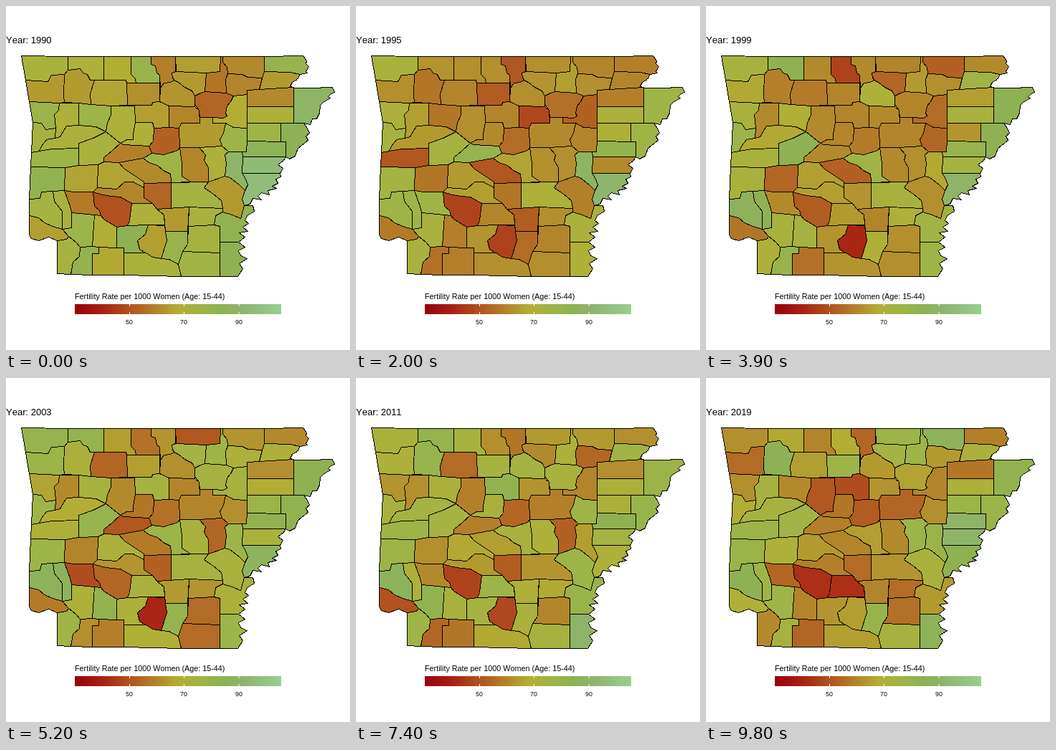
Write an HTML page that moves like this. It is 480x480 px and loops after 10 s.

```html
<!DOCTYPE html>
<html lang="en">
<head>
<meta charset="utf-8">
<title>Fertility rate by county</title>
<style>
html, body { margin: 0; width: 100%; height: 100%; overflow: hidden; background: #fff; }
svg { display: block; width: 100%; height: 100%; }
text { font-family: "Liberation Sans", Arial, sans-serif; font-kerning: none; }
#map path { stroke: #000; stroke-width: 1; stroke-linejoin: round; }
</style>
</head>
<body>
<svg viewBox="0 0 480 480">
<defs><linearGradient id="ramp"></linearGradient></defs>
<text id="year" x="0" y="52" font-size="13">Year: 1990</text>
<!-- data-v: rate at each of the key years -->
<g id="map" transform="translate(-.5 -.5)" shape-rendering="crispEdges">
<path d="M22 70 87 71V90L82 96 64 97 59 106 28 104Z" data-v="72 72 73 80 72 72 62"/>
<path d="M87 71H137V104H118L114 96 108 94 104 88 87 90Z" data-v="70 63 83 80 80 71 67"/>
<path d="M137 71H175V96L181 102 182 108H169L168 104H137Z" data-v="68 62 61 65 73 71 60"/>
<path d="M175 71H203V82L209 84 211 94 215 97V108H182L181 102 175 96Z" data-v="79 62 47 56 62 76 68"/>
<path d="M203 71H237V92L232 94 233 100 235 104 230 107 221 108 216 115 215 97 211 94 209 84 203 82Z" data-v="59 51 61 63 57 65 54"/>
<path d="M237 71H300V92L280 94 238 92Z" data-v="65 62 60 51 64 64 77"/>
<path d="M300 71H303V79L309 86 310 94 307 103 308 122 278 120 280 94 299 92Z" data-v="57 65 64 76 70 79 77"/>
<path d="M303 71H361V92L358 101 338 100 330 96 310 95 309 86 303 79Z" data-v="61 60 53 63 64 66 86"/>
<path d="M361 71 415 70 420 77 419 81 423 85 419 92 421 94 411 96 397 93 361 92Z" data-v="80 59 61 61 62 73 59"/>
<path d="M361 92 397 93 411 96 407 103 400 107 397 113 402 114 354 117 358 101Z" data-v="64 60 75 70 75 70 71"/>
<path d="M310 95 330 96 338 100 358 101 354 117 337 118V124L318 126 308 122 307 103Z" data-v="60 62 62 70 54 64 64"/>
<path d="M337 118 354 117 402 114V141H337Z" data-v="61 59 65 62 62 67 57"/>
<path d="M402 115H438L442 114H456L459 121 454 123 450 127 453 129 443 135 439 139 438 150 434 158 428 158 425 166 416 164H402Z" data-v="89 76 84 83 78 80 82"/>
<path d="M28 104 59 106 64 97 82 96 81 125 82 135 75 136 33 134Z" data-v="64 62 67 77 70 60 55"/>
<path d="M82 96 87 90 104 88 108 94 114 96 118 104H124L118 123 119 138 102 136 82 135 81 125Z" data-v="64 57 59 71 80 75 84"/>
<path d="M124 104H168L169 108 170 139 147 140 119 138 118 123Z" data-v="66 60 58 54 55 60 65"/>
<path d="M169 108H215V134L205 135 204 139H170Z" data-v="62 52 60 65 73 61 77"/>
<path d="M216 115 221 108 230 107 235 104 241 107 250 114 260 119 264 126V141L228 140 215 134Z" data-v="63 62 70 62 74 70 64"/>
<path d="M238 92 280 94 278 120 272 122 264 126 260 119 250 114 241 107 235 104 233 100 232 94Z" data-v="64 63 54 74 61 58 74"/>
<path d="M278 120 308 122 318 126 314 134 309 140 307 150 309 154 304 157 289 156H271L270 146 264 138V126L272 122Z" data-v="54 56 60 73 72 61 66"/>
<path d="M318 126 337 124V171L318 170 307 164H289V156L304 157 309 154 307 150 309 140 314 134Z" data-v="68 53 55 73 60 53 60"/>
<path d="M33 134 75 136 74 146 68 152 70 171 56 173 50 164 38 163Z" data-v="78 70 72 66 63 69 62"/>
<path d="M75 136H102V167L85 168 76 183 69 185 70 171 68 152 74 146Z" data-v="70 65 61 61 62 72 73"/>
<path d="M102 136 119 138 147 140V152L142 164 140 176 126 169 102 167Z" data-v="77 57 69 73 71 72 61"/>
<path d="M147 140H180L181 163 178 179V187H169L160 192 140 176 142 164 147 152Z" data-v="70 62 61 61 59 61 51"/>
<path d="M180 139H204L205 135 215 134 228 140V170L207 171 205 163H181Z" data-v="65 60 60 73 82 73 49"/>
<path d="M228 140 264 141 270 146 271 164H245L242 171 228 170Z" data-v="60 48 61 60 63 60 63"/>
<path d="M337 141H402V164H337Z" data-v="70 70 72 68 71 69 70"/>
<path d="M337 164H384V190L336 189Z" data-v="76 70 63 78 71 66 77"/>
<path d="M384 164H416L421 171 424 178 419 182 422 188 413 195 408 199 404 210 396 214 391 211V190H384Z" data-v="84 76 83 82 79 80 78"/>
<path d="M336 189 391 190V211H331L330 204H336Z" data-v="86 81 80 82 83 78 90"/>
<path d="M331 211H391L388 216 380 222 387 227 383 234H330Z" data-v="95 61 74 72 74 80 90"/>
<path d="M330 234H383L384 239 377 242 380 248 372 252 378 255 366 258 368 264 357 261 352 266 357 271 345 269 341 277 333 279 330 270 334 258 338 250 334 240Z" data-v="96 91 89 87 70 78 83"/>
<path d="M307 164 318 170 337 171V188L336 204H311L302 196 299 187 304 178Z" data-v="77 60 54 62 76 62 62"/>
<path d="M242 171 245 164H271V156H289V164H307L304 178 299 187 302 196 270 198H243Z" data-v="64 61 60 60 59 68 54"/>
<path d="M207 171 228 170 242 171 243 198 240 202 221 208 204 206 200 196 206 189Z" data-v="53 55 58 56 54 53 52"/>
<path d="M181 163H205L207 171 206 189 200 196 165 194 160 192 169 187H178V179Z" data-v="69 61 60 57 71 70 57"/>
<path d="M192 213 204 206 221 208 240 202 243 198 246 220V238L258 246 231 247V243L230 235 220 230 212 223 200 219Z" data-v="76 66 75 77 72 67 65"/>
<path d="M243 198H270L279 208 277 216 283 226V246H258L246 238V220Z" data-v="60 62 61 72 70 64 61"/>
<path d="M270 198 302 196 311 204 306 208 308 220 306 238 283 246V226L277 216 279 208Z" data-v="70 62 62 54 53 79 77"/>
<path d="M311 204H330L331 211 330 234 334 240 338 250 334 258 326 250 313 240 306 238 308 220 306 208Z" data-v="89 88 67 77 65 87 78"/>
<path d="M38 163 50 164 56 173 70 171 69 185 57 187 50 196 47 203 36 205Z" data-v="73 73 78 76 72 72 68"/>
<path d="M69 185 76 183 85 168 102 167 126 169 140 176 122 185 102 192V199L65 200 47 203 50 196 57 187Z" data-v="71 64 67 68 74 73 73"/>
<path d="M36 205 47 203 65 200 102 199V223L83 226 35 225Z" data-v="76 51 72 70 77 78 77"/>
<path d="M102 192 122 185 140 176 160 192 148 203 137 212V218L129 222 102 223Z" data-v="72 73 83 80 74 64 75"/>
<path d="M160 192 165 194 200 196 204 206 192 213 180 215 158 219 137 218V212L148 203Z" data-v="59 80 61 51 59 59 59"/>
<path d="M35 225 83 226 82 258 50 260 48 269 33 270Z" data-v="82 74 72 77 76 86 78"/>
<path d="M83 226 102 223 129 222 128 254 122 260H94L82 258Z" data-v="66 57 54 60 62 70 70"/>
<path d="M129 222 137 218 158 219 166 228 193 246V254L178 246H166L155 256 128 254Z" data-v="66 64 65 71 67 63 64"/>
<path d="M158 219 180 215 192 213 200 219 212 223 220 230 230 235 231 243V247L193 248V246L166 228Z" data-v="61 51 53 58 65 62 60"/>
<path d="M122 260 128 254 155 256 166 246H178L193 254V268L205 276H176L160 267 147 266 135 264Z" data-v="60 65 65 63 64 65 59"/>
<path d="M193 248 231 247V283L211 284 205 276 193 268Z" data-v="54 57 63 53 52 59 55"/>
<path d="M231 247 283 246 277 254 290 263 301 272 303 283 256 281 231 283Z" data-v="74 70 72 73 63 72 63"/>
<path d="M283 246 306 238 313 240 326 250 334 258 330 270 333 279 328 297 316 292 303 288V283L301 272 290 263 277 254Z" data-v="64 59 62 72 77 74 72"/>
<path d="M66 259 82 258 90 280 92 289V310L79 312 79 287 68 273Z" data-v="72 77 84 86 70 78 76"/>
<path d="M33 270 48 269 50 260 66 259 68 273 79 287V312L66 308 54 303 46 296 33 293Z" data-v="74 76 86 86 86 78 83"/>
<path d="M33 293 46 296 54 303 66 308 79 312 88 322 85 326 72 328 60 323 46 328 36 325 33 320Z" data-v="65 58 57 58 50 61 69"/>
<path d="M82 258 94 260H122L124 280 131 286 133 293 124 292 92 289 90 280Z" data-v="58 76 61 49 61 56 54"/>
<path d="M122 260 135 264 147 266 160 267 176 276 173 300 170 307 155 309 137 298 133 293 131 286 124 280Z" data-v="50 47 52 54 47 50 43"/>
<path d="M92 289 124 292 121 336 104 337 98 330 88 322 79 312 92 310Z" data-v="77 72 72 70 82 85 76"/>
<path d="M124 292 133 293 137 298 155 309V338L130 337 121 336Z" data-v="69 59 73 82 72 62 60"/>
<path d="M72 328 85 326 88 322 98 330 104 337 103 350 94 358 91 375 72 374Z" data-v="73 72 70 76 76 72 61"/>
<path d="M104 337 121 336 130 337V346H121V376L91 375 94 358 103 350Z" data-v="81 56 79 62 54 68 73"/>
<path d="M130 337 155 338H165V376H121V346H130Z" data-v="67 59 56 59 57 60 54"/>
<path d="M155 309 170 307 199 306 195 319 184 328 187 340 196 345H165V338H155Z" data-v="84 63 63 70 73 71 63"/>
<path d="M176 276H205L211 284 221 292 222 306H199L170 307 173 300Z" data-v="70 60 64 72 77 54 43"/>
<path d="M199 306 222 307 225 328 217 353 205 351 187 340 184 328 195 319Z" data-v="65 47 41 41 48 57 65"/>
<path d="M211 284 256 281 254 315H223L221 292Z" data-v="64 52 60 64 69 51 60"/>
<path d="M223 315H254V333L247 343 241 361 228 354 217 353 225 328Z" data-v="79 55 69 80 71 65 79"/>
<path d="M165 345H196L205 351 217 353 228 354 241 361 245 378 165 376Z" data-v="72 62 63 69 67 76 65"/>
<path d="M256 281 303 283V289L293 293 291 306 255 308Z" data-v="72 62 70 63 67 56 55"/>
<path d="M255 308 291 306 299 308V345L247 343 254 333Z" data-v="73 60 62 55 60 66 56"/>
<path d="M247 343 299 345V378H245L241 361Z" data-v="75 62 62 55 73 68 73"/>
<path d="M303 288 316 292 328 297 333 279H345L347 287 337 293 334 300 339 304 331 309 338 315 326 317 334 323 325 330H299V308L291 306 293 293Z" data-v="82 71 75 71 79 79 64"/>
<path d="M299 330H325L334 337 325 342 328 349 337 353 326 360 331 367 324 378H299Z" data-v="83 69 76 77 90 59 85"/>
</g>
<text x="96" y="409" font-size="10.8">Fertility Rate per 1000 Women (Age: 15-44)</text>
<rect x="96" y="416" width="288" height="14" fill="url(#ramp)"/>
<path d="M172.5 416v3m0 8v3M248.5 416v3m0 8v3M325 416v3m0 8v3" stroke="#fff"/>
<g font-size="8.8" text-anchor="middle">
<text x="172" y="444">50</text><text x="248" y="444">70</text><text x="325" y="444">90</text>
</g>
</svg>
<script>
const LOOP = 10000, LOW = 30, HIGH = 105.4;
const keyYears = [0, 5, 9.5, 13.5, 21, 24, 29];
const stops = [
  [30, 153, 0, 13], [40, 168, 33, 19], [50, 177, 82, 31], [60, 179, 133, 42],
  [68, 178, 174, 52], [76, 159, 180, 70], [84, 142, 177, 83], [92, 142, 181, 112],
  [HIGH, 153, 206, 145]
];

const mix = (a, b, k) => a + (b - a) * k;

// Index and fraction of x inside an ascending list.
function locate(list, x) {
  let i = 0;
  while (i < list.length - 2 && x >= list[i + 1]) i++;
  return [i, (x - list[i]) / (list[i + 1] - list[i])];
}

const rates = stops.map(s => s[0]);
function rateColor(rate) {
  const [i, k] = locate(rates, rate);
  const rgb = [1, 2, 3].map(c => Math.round(mix(stops[i][c], stops[i + 1][c], k)));
  return `rgb(${rgb})`;
}

document.getElementById('ramp').append(...stops.map(([rate]) => {
  const stop = document.createElementNS('http://www.w3.org/2000/svg', 'stop');
  stop.setAttribute('offset', (rate - LOW) / (HIGH - LOW));
  stop.setAttribute('stop-color', rateColor(rate));
  return stop;
}));

const counties = [...document.querySelectorAll('#map path')].map(el => ({
  el, values: el.dataset.v.split(' ').map(Number)
}));
const label = document.getElementById('year');

// Each year holds, then shows one halfway step; years get shorter after the tenth.
function yearAt(t) {
  const [start, first, length] = t < 4100 ? [0, 0, 400] : [4100, 10, 300];
  const since = t - start;
  const halfway = since % length >= length - 100;
  return first + Math.floor(since / length) + (halfway ? 0.5 : 0);
}

let shown = -1;
function draw(year) {
  const [i, k] = locate(keyYears, year);
  for (const { el, values } of counties)
    el.style.fill = rateColor(mix(values[i], values[i + 1], k));
  label.textContent = `Year: ${1990 + Math.floor(year)}`;
  shown = year;
}

const began = performance.now();
function tick() {
  const year = yearAt((performance.now() - began) % LOOP);
  if (year !== shown) draw(year);
  requestAnimationFrame(tick);
}
tick();
</script>
</body>
</html>
```
